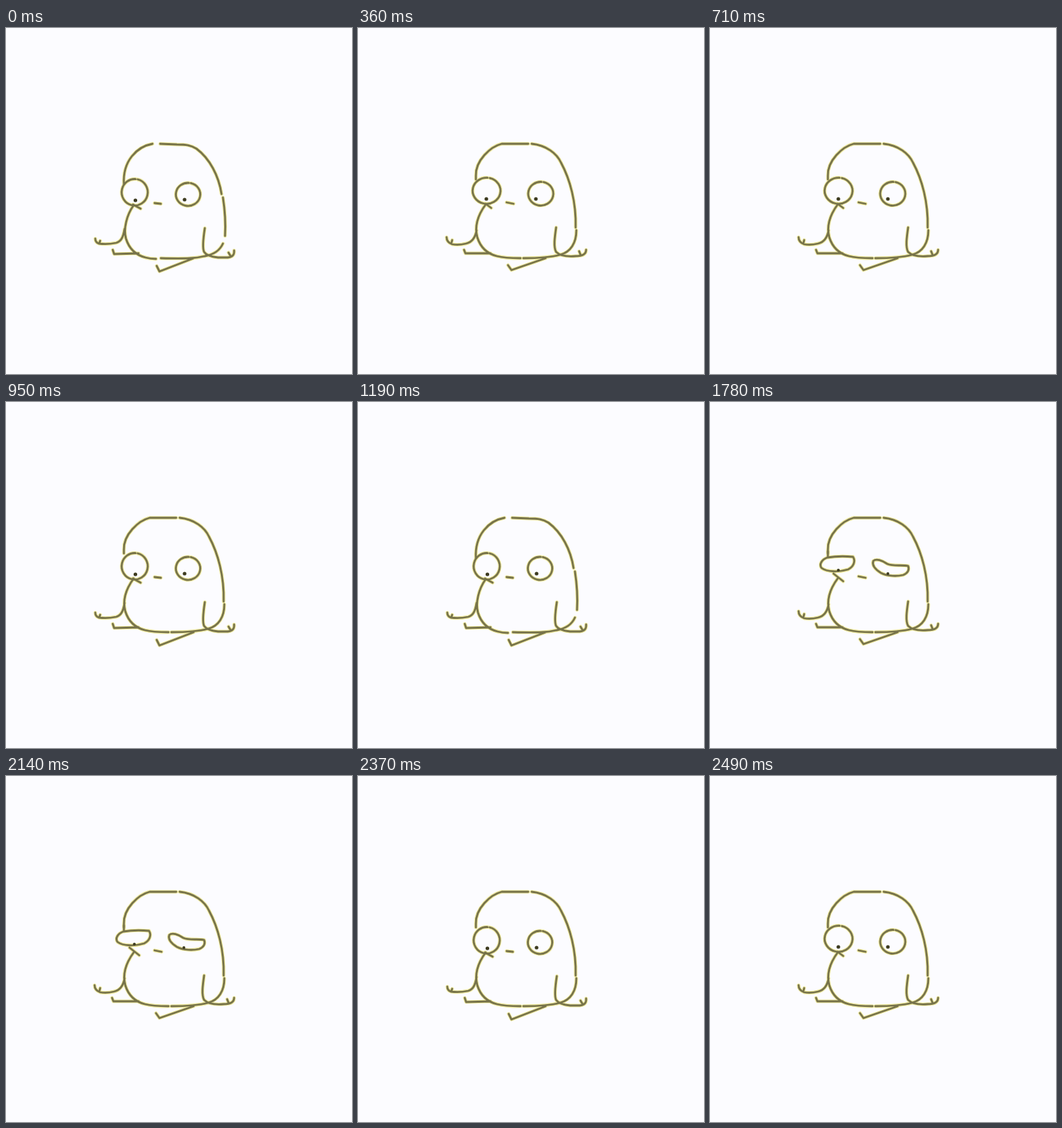
These frames come from a looping animation (496 by 496 pixels, 2610 ms). An HTML page with a canvas:

```html
<!DOCTYPE html>
<html lang="en">
<head>
<meta charset="utf-8">
<title>Sleepy bird</title>
<style>
  html, body { margin: 0; width: 100%; height: 100%; overflow: hidden; background: #fcfcff; }
  canvas { display: block; width: 496px; height: 496px; }
</style>
</head>
<body>
<canvas id="stage" width="496" height="496"></canvas>
<script>
const ctx = document.getElementById('stage').getContext('2d');
const LOOP = 2610;

// Start time of each drawing.
const starts = [];
for (let i = 0, t = 0; i < 22; i++) {
  starts.push(t);
  t += [3, 12, 19].includes(i) ? 110 : 120;
}

const bodyA = `
  M210 166 C188 170 167 190 169 224
  M221 166 L245 167 C258 167 265 168 273 173 C292 187 305 212 309 238
  M311 243 C314 262 315 280 314 298
  M311 309 C306 320 297 325 285 327 C272 330 262 331 222 330
  M183 254 C173 268 168 288 172 302 C177 318 188 326 200 329 Q207 331 215 331`;

const limbsA = `
  M285 287 C283 300 281 315 284 321 C287 326 295 328 304 329 L318 329 Q328 328 327 319
  M319 322 L322 327
  M170 288 C168 300 165 306 158 308 C148 310 140 310 133 309 Q128 307 128 302
  M135 305 L134 308
  M153 318 L155 324 L190 323
  M216 341 L220 349 L269 330`;

const bodyB = `
  M244 166 L206 166 C190 170 168 190 169 212 L169 217
  M249 166 C270 168 285 180 291 193 C304 217 313 250 312 286
  M313 290 C313 308 305 321 290 325 C275 329 255 330 237 330
  M183 253 C172 268 167 285 171 300 C176 316 187 324 199 327 Q210 330 233 330`;

const limbsB = `
  M284 286 C282 300 280 314 284 321 C289 326 300 328 312 327 Q327 327 327 318
  M317 320 L319 325
  M170 290 C168 302 163 307 155 309 C147 311 140 311 135 310 Q127 307 127 300
  M135 304 L134 308
  M152 318 L154 323 L190 323
  M215 340 L220 347 L269 330`;

const mouthA = 'M213 251 L222 252';
const mouthB = 'M213 250 L223 252';

// Nearly closed ellipse with a small break near the top.
function ring(x, y, rx, ry) {
  const p = new Path2D();
  p.ellipse(x, y, rx, ry, 0, -1.34, Math.PI * 2 - 1.5);
  return p;
}

const openA = {
  lines: [ring(184.5, 235.5, 18.7, 19), ring(261, 238.5, 17.5, 16.5),
    new Path2D('M182 253 L193 259')],
  pupils: [[185.5, 247], [256, 246]]
};

const openB = {
  lines: [ring(184.3, 233.3, 20, 18.7), ring(262, 237.5, 18, 17),
    new Path2D('M183 252 L191 258')],
  pupils: [[184, 245], [255, 245]]
};

const droopA = {
  lines: [new Path2D(`
    M206 222 C212 226 209 236 202 243 C190 249 168 249 160 243 C155 238 157 229 165 227 Z
    M235 226 C232 231 236 240 243 245 C252 251 270 252 279 249 C287 245 290 236 287 232
    C280 230 265 230 250 226 C243 224 238 223 235 226
    M183 252 L192 259`)],
  pupils: [[184, 243], [255, 245]]
};

const droopB = {
  lines: [new Path2D(`
    M205 222 C209 228 206 236 198 240 C185 244 168 244 160 238 C156 233 160 226 168 223
    C180 221 195 221 205 222
    M234 228 C232 234 237 240 245 245 C255 250 268 250 277 248 C284 245 286 240 284 235
    C276 233 262 236 254 232 C247 227 238 224 234 228
    M177 246 L191 257 M169 214 L169 222`)],
  pupils: [[184, 241], [255, 246]]
};

const pose = (body, limbs, mouth, open, droop) =>
  ({ figure: new Path2D(body + limbs + mouth), open, droop });

// Three drawings that give the line its wobble.
const poses = [
  pose(bodyB, limbsB, mouthB, openB, droopB),
  pose(bodyA, limbsA, mouthA, openA, droopA),
  pose(bodyB, limbsA, mouthA, openA, droopA)
];

function ink(paths, color, width) {
  ctx.strokeStyle = color;
  ctx.lineWidth = width;
  paths.forEach(p => ctx.stroke(p));
}

function draw(step) {
  const { figure, open, droop } = poses[step === 0 ? 1 : step % 3];
  const drowsy = step >= 13 && step <= 18;
  const eyes = drowsy ? droop : open;
  const paths = [figure, ...eyes.lines];

  ctx.fillStyle = '#fcfcff';
  ctx.fillRect(0, 0, 496, 496);
  ctx.lineCap = ctx.lineJoin = 'round';
  ink(paths, '#ece79f', 5);
  ink(paths, '#77734a', 2.8);

  ctx.fillStyle = '#3d3b20';
  for (const [x, y] of eyes.pupils) {
    ctx.beginPath();
    ctx.arc(x, y, drowsy ? 2 : 2.6, 0, Math.PI * 2);
    ctx.fill();
  }
}

const origin = performance.now();
function tick(now) {
  const t = Math.max(0, now - origin) % LOOP;
  draw(starts.findLastIndex(s => s <= t));
  requestAnimationFrame(tick);
}
draw(0);
requestAnimationFrame(tick);
</script>
</body>
</html>
```
